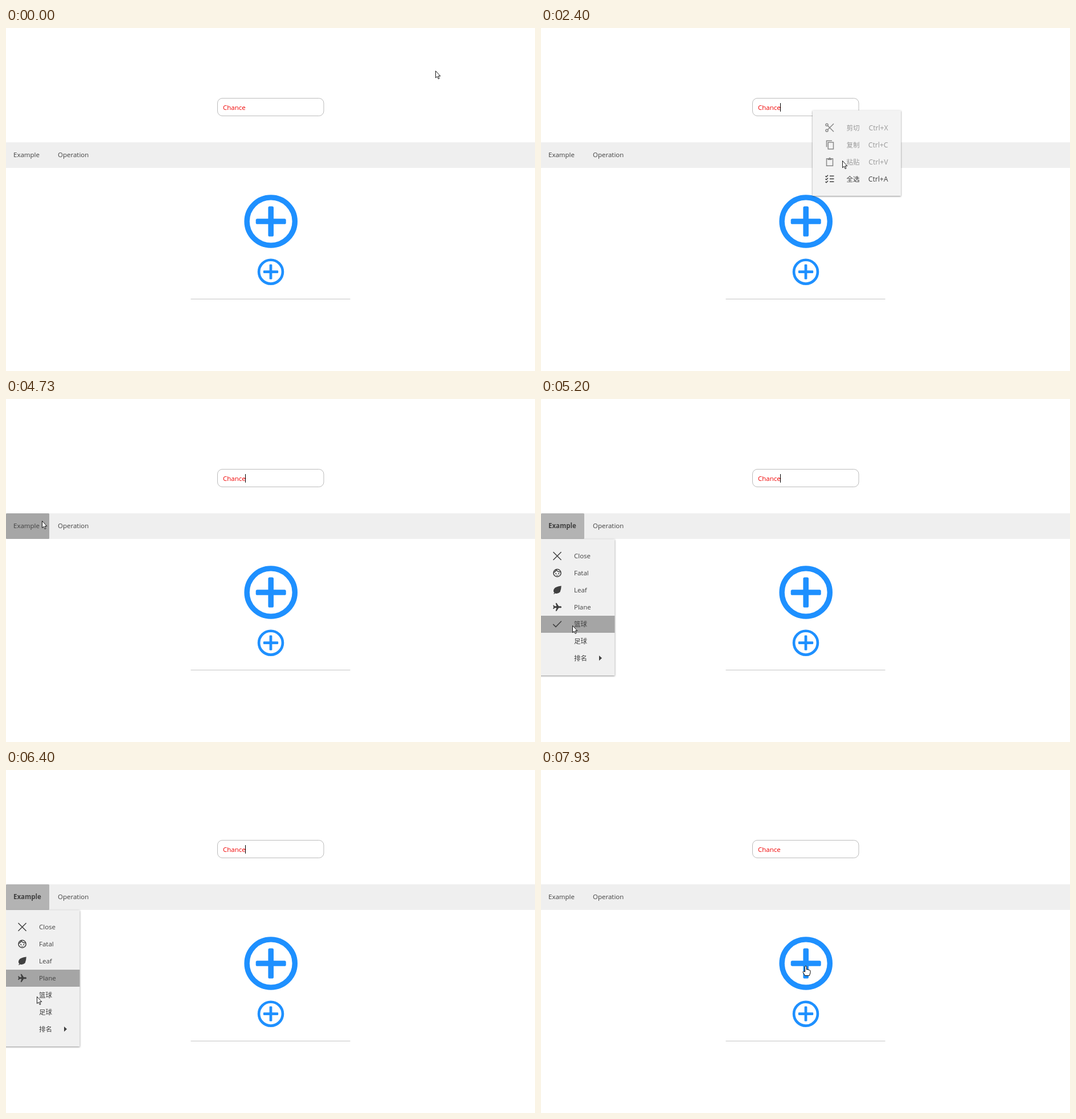
An HTML page for the animation above (8 s loop, 929 px wide and 603 px high).

```html
<!DOCTYPE html>
<html lang="zh-CN">
<head>
<meta charset="utf-8">
<style>
html, body { margin: 0; width: 100%; height: 100%; overflow: hidden; background: #fff }
svg { display: block; width: 929px; height: 603px }
text { font: 11.5px "Open Sans", "Noto Sans CJK SC", "Noto Sans CJK", sans-serif; fill: #404040 }
.popup { filter: drop-shadow(0 1px 1.5px rgba(0,0,0,.45)) }
.line { fill: none; stroke: #404040; stroke-width: 1.5 }
.solid { fill: #404040 }
.off text { fill: #999 }
.off .line { stroke: #888 }
.off .solid { fill: #888 }
</style>
</head>
<body>
<svg viewBox="0 0 929 603">
  <defs>
    <g id="plus" fill="#1e90ff">
      <circle r="42.1" fill="none" stroke="#1e90ff" stroke-width="9.4"/>
      <rect x="-26.5" y="-4.8" width="53" height="9.6" rx="2.6"/>
      <rect x="-4.8" y="-26.5" width="9.6" height="53" rx="2.6"/>
    </g>
  </defs>
  <rect x="371.5" y="123.5" width="186.5" height="31" rx="8.5" fill="#fff" stroke="#bbb"/>
  <text x="381" y="143.6" style="fill:#f00000">Chance</text>
  <path id="caret" d="M420.5 132V147" stroke="#000"/>
  <path d="M0 201H929V246H0Z" fill="#efefef"/>
  <rect id="tab" y="201" width="76" height="45" rx="1.5"/>
  <text id="tabText" x="13" y="227.4">Example</text>
  <text x="91" y="227.4">Operation</text>
  <use href="#plus" transform="translate(465.2 340)"/>
  <use href="#plus" transform="translate(465 428.7) scale(.497)"/>
  <path d="M324.5 476.5H604.5" stroke="#c4c4c4"/>
  <g id="edit"><path class="popup" d="M477 145H632V295H477Z" fill="#f3f3f3"/></g>
  <g id="sub">
    <path class="popup" d="M131 441H251V561H131Z" fill="#f0f0f0"/>
    <rect id="subHot" x="131" width="120" height="30" fill="#a5a5a5"/>
  </g>
  <g id="menu">
    <path class="popup" d="M-3 246.5H129.5V486H-3Z" fill="#f0f0f0"/>
    <rect id="hot" width="129.5" height="30" fill="#a5a5a5"/>
  </g>
  <g id="cursor" stroke="#000" fill="#fff" stroke-linejoin="round">
    <path id="arrow" stroke-width=".9" d="M.5 .5V12.6L3.3 10.2 5.2 14.5 7 13.7 5.2 9.5H8.8Z"/>
    <path id="beam" fill="none" d="M-3 -7.5H3M0 -7.5V7.5M-3 7.5H3"/>
    <path id="hand" d="M-1.5 10V1.5Q0 -.5 1.5 1.5V7Q3 5.6 4 7.3 5.6 6.3 6.3 8 8 7.5 8 9.5V12.5L6.3 17.5H-1.5L-5 11.5Q-4.5 8.5 -1.5 11Z"/>
  </g>
</svg>
<script>
const $ = id => document.getElementById(id);
const LOOP = 8000, STEP = 200 / 3, LAG = 2 * STEP, ROW = 29.9, TOP = 261;

// Icons are drawn around the centre of their row.
const line = d => `<path class="line" d="${d}"/>`;
const solid = d => `<path class="solid" d="${d}"/>`;
const ring = (x, y, r) => `<circle class="line" cx="${x}" cy="${y}" r="${r}"/>`;
const dot = (x, y, r) => `<circle class="solid" cx="${x}" cy="${y}" r="${r}"/>`;
const ticks = [-5, 0, 5].map(y => `M-7.5 ${y}l1.5 1.5 3 -3M0 ${y}H7.5`).join('');
const icons = {
  cut: ring(-5, -5, 2) + ring(-5, 5, 2) + line('M-3.5 -3.5L7 7M-3.5 3.5L7 -7'),
  copy: line('M-5.5 4V-7H4M-2.8 -4.2H6.5V7.5H-2.8Z'),
  paste: line('M-5.5 -5.5H5.5V7H-5.5Z') + solid('M-3.5 -6H-2Q0 -9.5 2 -6H3.5V-3.2H-3.5Z'),
  list: line(ticks),
  close: line('M-7 -7L7 7M-7 7L7 -7'),
  face: ring(0, 0, 6.6) + line('M-6.5 -.5Q-3 -2 -1.5 -5.5Q1 -1.5 6 -2') +
    dot(-2.3, 1.2, 1.1) + dot(2.7, 1.2, 1.1) + solid('M-2.5 4.5Q0 2.5 2.5 4.5Z'),
  leaf: solid('M7.2 -7.2Q-3 -6 -5.5 -2T-5 5L-6.8 7H-5L-3.8 5.6Q1 7.5 5 3.5 7 -1 7.2 -7.2Z'),
  plane: solid('M7.5 0Q7.5 -1.5 6 -1.5H2.6L-1 -7H-2.9L-1.2 -1.5H-4.5L-5.9 -3.2H-7.4L-6.4 0 -7.4 3.2H-5.9L-4.5 1.5H-1.2L-2.9 7H-1L2.6 1.5H6Q7.5 1.5 7.5 0Z'),
  check: line('M-7.3 .3L-2.5 5 7.3 -5')
};
const icon = (name, x, y) => `<g id="${name}" transform="translate(${x} ${y})">${icons[name]}</g>`;
const add = (id, html) => $(id).insertAdjacentHTML('beforeend', html);

[['cut', '剪切', 'X'], ['copy', '复制', 'C'], ['paste', '粘贴', 'V'], ['list', '全选', 'A']]
  .forEach(([name, label, key], i) => {
    const y = 175.3 + 30 * i;
    add('edit', `<g class="${name == 'list' ? '' : 'off'}">${icon(name, 507, y)}
      <text x="536.5" y="${y + 4.5}">${label}</text>
      <text x="609.5" y="${y + 4.5}" text-anchor="end" style="font-size:12.2px">Ctrl+${key}</text></g>`);
  });
[['close', 'Close'], ['face', 'Fatal'], ['leaf', 'Leaf'], ['plane', 'Plane'], ['check', '篮球'], ['', '足球'], ['', '排名']]
  .forEach(([name, label], i) => {
    const y = TOP + 15 + ROW * i;
    add('menu', `${name && icon(name, 28.5, y)}<text x="58" y="${y + 4.2}">${label}</text>`);
  });
add('menu', solid('M102 451L107 455.5 102 460Z'));
['第一', '第二', '第三'].forEach((label, i) => add('sub', `<text x="189" y="${475 + 30 * i}">${label}</text>`));

// Pointer moves: start, end, x, y; it rests in between.
const moves = [
  [0, 530, 477, 148], [1200, 1470, 524, 240], [1470, 1840, 142, 226], [1840, 2400, 529, 233],
  [2400, 2870, 221, 226], [2870, 3530, 12, 228], [3670, 4200, 417, 222], [4200, 4730, 63, 214],
  [4730, 5130, 55, 398], [5470, 5800, 42, 226], [6000, 6400, 54, 398],
  [6400, 7070, 165, 472], [7400, 7930, 465, 344]
];
function pointer(t) {
  let x = 754, y = 75;
  for (const [start, end, toX, toY] of moves) {
    const p = Math.min(1, Math.max(0, (t - start) / (end - start)));
    const ease = p * p * (3 - 2 * p);
    x += (toX - x) * ease;
    y += (toY - y) * ease;
  }
  return [x, y];
}
const during = (t, a, b) => t >= a && t < b;
const show = (id, on) => $(id).style.display = on ? '' : 'none';

function highlight(id, row, count, top, height, inside) {
  show(id, inside && row >= 0 && row < count);
  $(id).setAttribute('y', Math.round(top + height * row));
}

function draw(now) {
  const t = Math.floor((now % LOOP + 4) / STEP) * STEP + 1;
  const [x, y] = pointer(t), [hoverX, hoverY] = pointer(t - LAG);

  // Each press on the tab opens the menu a moment later.
  const press = [5930, 4720, 3270].find(start => t >= start) ?? -LOOP;
  const open = during(t, 3270, 3660) || during(t, 4800, 5460) || during(t, 5990, 7520);
  const editOpen = during(t, 730, 2600), subOpen = during(t, 6790, 7520);
  show('edit', editOpen);
  show('menu', open);
  show('sub', subOpen);
  show('check', t < 5460);
  show('caret', during(t, 660, 7590) && !during(t, 4250, 4600));

  const row = subOpen ? 6 : Math.floor((hoverY - TOP) / ROW);
  highlight('hot', row, 7, TOP, ROW, subOpen || hoverX < 130);
  highlight('subHot', Math.floor((hoverY - 456) / 30), 3, 456, 30, hoverX > 131);

  const active = open || (x < 76 && y > 201 && y < 246);
  const grey = active ? Math.round(183 - 18 * Math.exp((press - t) / 300)) : 239;
  $('tab').setAttribute('fill', `rgb(${grey},${grey},${grey})`);
  $('tabText').style.fontWeight = open ? 700 : 400;

  const beam = !editOpen && during(x, 371, 558) && during(y, 123, 155);
  const hand = Math.hypot(x - 465, y - 340) < 47;
  show('beam', beam);
  show('hand', hand);
  show('arrow', !beam && !hand);
  $('cursor').setAttribute('transform', `translate(${Math.round(x)} ${Math.round(y)})`);
}
function tick() {
  draw(performance.now());
  requestAnimationFrame(tick);
}
tick();
</script>
</body>
</html>
```
